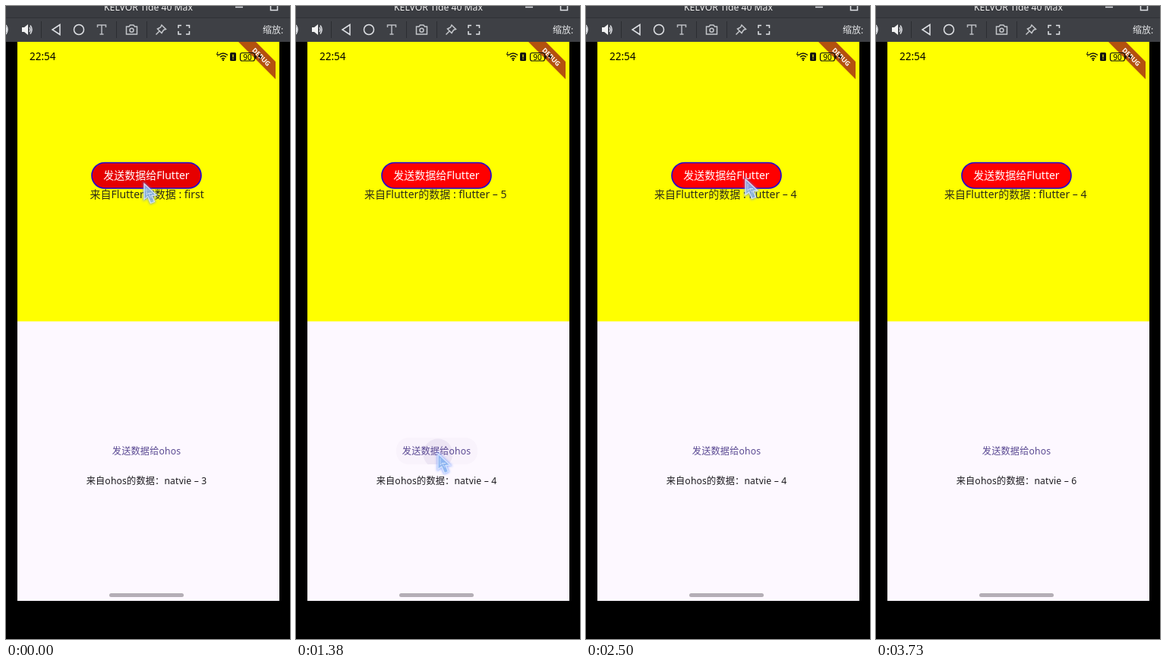
Animation, 374 px wide and 830 px high, one loop 3.8 s. Source, as an HTML page:

```html
<!DOCTYPE html>
<html lang="zh-CN">
<head>
<meta charset="utf-8">
<title>Message demo</title>
<style>
  html, body { margin: 0; width: 100%; height: 100%; overflow: hidden; background: #000; }
  svg { display: block; width: 374px; height: 830px; }
  text { font-family: "Noto Sans", "Noto Sans CJK SC", "Noto Sans CJK", sans-serif; }
  .line { fill: none; stroke: #dfe1e5; stroke-width: 1.5; }
  .ink { fill: none; stroke: #111; stroke-width: 1.4; }
  .big { font-size: 14px; }
  .small { font-size: 12.2px; letter-spacing: .15px; }
</style>
</head>
<body>
<svg viewBox="0 0 374 830">
  <defs>
    <clipPath id="pill"><rect x="132" y="566" width="107" height="35" rx="16"/></clipPath>
    <filter id="blur" x="-60%" y="-60%" width="220%" height="220%"><feGaussianBlur stdDeviation="1.8"/></filter>
    <path id="arrow" d="M0 0V20.500L4.800 17L8.500 25.500L13.500 23.500L10 15.500L16 15Z"/>
  </defs>

  <!-- window bars -->
  <rect width="374" height="47" fill="#3e4045"/>
  <rect width="374" height="15" fill="#3a3c41"/>
  <path d="M0 15.500H374" stroke="#303236"/>
  <text x="187.500" y="6" font-size="12.200" fill="#eee" text-anchor="middle">KELVOR Tide 40 Max</text>
  <path class="line" d="M302 1.500H312M348.500 -4V5.500H357.500V-4" stroke-width="1.200"/>
  <path d="M46.500 20V42M145.500 20V42M185.500 20V42" stroke="#2c2e32"/>
  <path class="line" d="M0 25Q4 31 0 37M0 28Q1.500 31 0 34"/>
  <path d="M21 28H24L29 24V38L24 34H21Z" fill="#f2f2f2"/>
  <path class="line" d="M31 28Q33 31 31 34M32 25.500Q36 31 32 36.500"/>
  <path class="line" d="M71 24.500V37.500L61 31Z"/>
  <circle class="line" cx="96" cy="31" r="6.500"/>
  <path class="line" d="M120.500 28V25H131.500V28M126 25V37M123.500 37H128.500" style="stroke:#b9bbc0"/>
  <path class="line" d="M158.500 27H162L163.500 25H168L169.500 27H172.500V37H158.500Z" style="stroke:#c4c6ca"/>
  <circle class="line" cx="165.500" cy="31.700" r="2.500" style="stroke:#c4c6ca"/>
  <path class="line" d="M205 25L210.500 30.500L207.500 31.500L205 35.500L199.500 30L203.500 28ZM202 33L197.500 37.500" style="stroke:#c4c6ca"/>
  <path class="line" d="M227 29V25.500H231M237 25.500H241.500V29M241.500 33V37H237M231 37H227V33"/>
  <text x="338" y="35.500" font-size="12" fill="#e3e4e6">缩放:</text>

  <!-- phone screen -->
  <rect x="15" y="47" width="345" height="367" fill="#ff0"/>
  <rect x="15" y="413.500" width="345" height="366.500" fill="#fdf8ff"/>
  <rect x="136" y="770" width="98" height="5" rx="2.500" fill="#b4aeb6"/>
  <path d="M306 47H329L355 73V96Z" fill="#b3510f"/>
  <text transform="translate(334 69) rotate(45)" font-size="8.600" font-weight="800" fill="#fff" text-anchor="middle">DEBUG</text>

  <!-- status bar -->
  <text x="31" y="71" font-size="13.500" font-weight="500">22:54</text>
  <path class="ink" d="M280 64.500Q286 59.500 292 64.500M282 67Q286 63.500 290 67M284 69.500Q286 67.500 288 69.500" stroke-width="1.700"/>
  <circle cx="286" cy="71" r="1.100"/>
  <path class="ink" d="M279 60L277.500 63.500H279.500L278.500 66" style="stroke-width:1"/>
  <rect x="295" y="61" width="8" height="11" rx="1.500" fill="#111"/>
  <path d="M299 63.500V67.500M299 68.700V70" stroke="#ff0" stroke-width="1.300"/>
  <rect class="ink" x="308.500" y="61.500" width="19" height="10.500" rx="2.500" style="stroke-width:1.200"/>
  <text x="318" y="70.500" font-size="10" font-weight="500" text-anchor="middle">90</text>
  <path d="M329 65V69" stroke="#111" stroke-width="1.500"/>
  <path d="M335 61L332 67H334.500L333.500 72L337 65.500H334.700Z" fill="#111"/>

  <!-- native half -->
  <rect id="red" x="113" y="205.500" width="144" height="33.500" rx="16.700" stroke="#1a00d8" stroke-width="1.600"/>
  <text class="big" x="185" y="227" fill="#fff" text-anchor="middle">发送数据给Flutter</text>
  <text class="big" id="top" y="252" fill="#2c2c18"></text>

  <!-- Flutter half -->
  <g clip-path="url(#pill)" fill="#533a91">
    <rect id="tint" x="132" y="566" width="107" height="35"/>
    <circle id="ripple" cx="187" cy="587"/>
  </g>
  <text class="small" x="185" y="588" fill="#5b4a93" text-anchor="middle">发送数据给ohos</text>
  <text class="small" id="low" x="185" y="626.500" fill="#1d1b20" text-anchor="middle"></text>

  <g id="cursor">
    <use href="#arrow" filter="url(#blur)" fill="#5a86ff" stroke="#5a86ff" stroke-width="3" opacity=".6"/>
    <use href="#arrow" fill="#8db8ee" fill-opacity=".75" stroke="#e4efff" stroke-width="1.300" stroke-opacity=".85"/>
    <path d="M3 6V15L5.500 12.500L9 18M5.500 12.500H10Z" fill="none" stroke="#e8f2ff" stroke-opacity=".6"/>
  </g>
</svg>
<script>
  const LOOP = 3800;
  const $ = id => document.getElementById(id);
  const el = Object.fromEntries(['red', 'top', 'low', 'tint', 'ripple', 'cursor'].map(id => [id, $(id)]));

  // time, x, y
  const path = [
    [0, 182, 233], [60, 182, 233], [450, 187, 587], [1840, 187, 587],
    [1970, 245, 410], [2050, 220, 265], [2320, 210, 227], [3199, 210, 227],
    [3200, 223, 275], [3270, 232, 330], [3510, 325, 778]
  ];
  // start, hold
  const taps = [[810, 60], [1380, 60], [1840, 290]];
  const presses = [[0, 60], [2560, 2680], [3200, 3270]];
  const topText = [[0, 'first'], [810, 'flutter – 6'], [1380, 'flutter – 5'], [1840, 'flutter – 4']];
  const lowText = [[0, 3], [60, 4], [2680, 5], [3270, 6]];

  const clamp = v => Math.min(1, Math.max(0, v));
  const ease = p => p * p * (3 - 2 * p);
  const at = (steps, t) => steps.findLast(s => s[0] <= t);

  function moveCursor(t) {
    const i = path.findLastIndex(k => k[0] <= t);
    const a = path[i], b = path[i + 1];
    el.cursor.style.display = b ? '' : 'none';
    if (!b) return;
    const p = ease((t - a[0]) / (b[0] - a[0]));
    const mix = n => a[n] + (b[n] - a[n]) * p;
    el.cursor.setAttribute('transform', `translate(${mix(1)} ${mix(2)})`);
  }

  function drawRipple(t) {
    const [start, hold] = at(taps, t) || [LOOP, 0];
    const age = t - start;
    const alpha = age < 0 ? 0 : 1 - clamp((age - hold) / 80);
    el.ripple.setAttribute('r', 19 + 50 * clamp(age / 120));
    el.ripple.setAttribute('opacity', .075 * alpha);
    el.tint.setAttribute('opacity', .025 * alpha);
  }

  function draw(t) {
    const word = at(topText, t)[1];
    el.top.setAttribute('x', word === 'first' ? 110.5 : 90);
    el.top.textContent = '来自Flutter的数据 : ' + word;
    el.low.textContent = '来自ohos的数据：natvie – ' + at(lowText, t)[1];
    const down = presses.some(([from, to]) => t >= from && t < to);
    el.red.setAttribute('fill', down ? '#e60000' : '#f00');
    drawRipple(t);
    moveCursor(t);
  }

  const t0 = performance.now();
  function tick() {
    draw((performance.now() - t0) % LOOP);
    requestAnimationFrame(tick);
  }
  tick();
</script>
</body>
</html>
```
